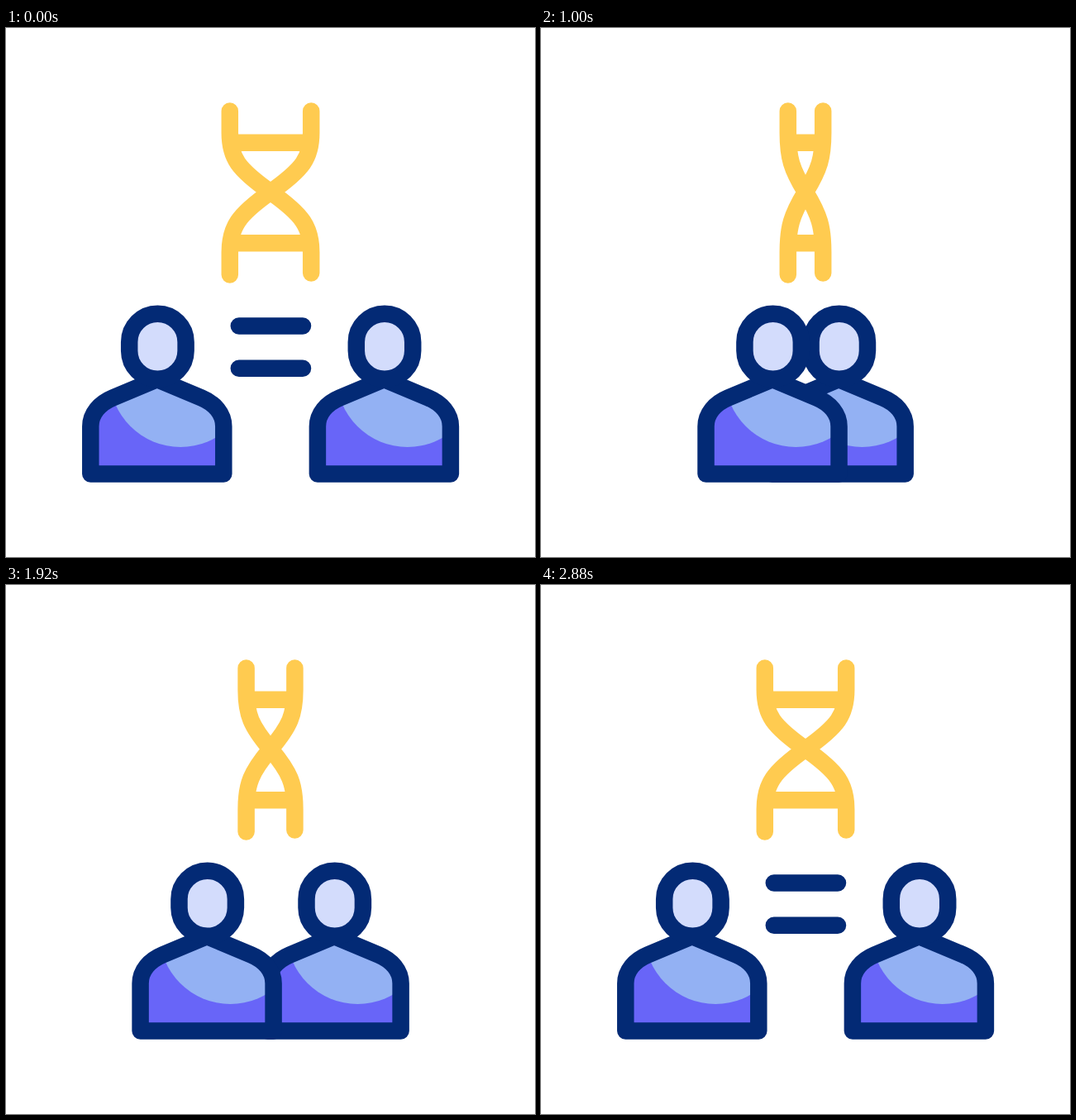
An HTML page for the animation above (3 s loop, 640x640 px).

```html
<!DOCTYPE html>
<html lang="en">
<head>
<meta charset="utf-8">
<title>Shared DNA</title>
<style>
  html, body { margin: 0; width: 100%; height: 100%; overflow: hidden; background: #fff; }
  svg { display: block; width: 100vw; height: 100vh; }
  .line { fill: none; stroke-width: 20.5; stroke-linecap: round; stroke-linejoin: round; }
  .navy { stroke: #032a75; }
  .gold { stroke: #ffcb50; }
</style>
</head>
<body>
<svg viewBox="0 0 640 640">
  <defs>
    <clipPath id="torso"><path class="body"/></clipPath>
    <g id="person">
      <path class="body" fill="#6865f8"/>
      <circle cx="28.3" cy="421.2" r="85.8" fill="#93b1f3" clip-path="url(#torso)"/>
      <path class="body line navy"/>
      <rect id="head" class="line navy" x="-33.6" y="345.8" width="68.4" height="79" rx="34.2" style="fill:#d3dcfc"/>
    </g>
  </defs>
  <path id="dna" class="line gold"/>
  <path id="bars" class="line navy"/>
  <use id="right" href="#person"/>
  <use id="left" href="#person"/>
</svg>
<script>
  const LOOP = 3000, STEP = 40;
  const $ = id => document.getElementById(id);
  const bodies = document.querySelectorAll('.body');

  // Cubic Bézier easing, solved by bisection.
  function bezier(x1, y1, x2, y2) {
    const at = (a, b, s) => 3 * a * s * (1 - s) ** 2 + 3 * b * s * s * (1 - s) + s ** 3;
    return x => {
      let lo = 0, hi = 1;
      for (let i = 0; i < 24; i++) {
        const mid = (lo + hi) / 2;
        if (at(x1, x2, mid) < x) lo = mid; else hi = mid;
      }
      return at(y1, y2, (lo + hi) / 2);
    };
  }
  const smooth = bezier(0.333, 0, 0.667, 1);
  const glide = bezier(0.33, 0, 0.2, 1);
  const speedUp = bezier(0.333, 0, 0.833, 0.833);
  const slowDown = bezier(0.167, 0.167, 0.667, 1);

  // Each row: start, end, from, to, easing.
  const tracks = {
    twist: [
      [200, 800, 49.2, 0, speedUp],
      [800, 1400, 0, 49.2, slowDown],
      [1600, 2200, 49.2, 0, speedUp],
      [2200, 2800, 0, 49.2, slowDown]
    ],
    gap: [
      [738, 1340, 137.3, 0, glide],
      [1708, 2311, 0, 137.3, glide]
    ],
    bar: [
      [200, 740, 77.2, 0, smooth],
      [1940, 2555, 0, 77.2, glide]
    ]
  };

  function value(rows, t) {
    let v = rows[0][2];
    for (const [start, end, from, to, ease] of rows) {
      if (t < start) break;
      v = t >= end ? to : from + (to - from) * ease((t - start) / (end - start));
    }
    return v;
  }

  function strand(w, end) {
    const x = k => 320 + k * w;
    return `M${x(-1)} 100.5V127C${x(-1)} 157 ${x(-0.8)} 170.7 320 198.5` +
           `C${x(0.8)} 226.3 ${x(1)} 241 ${x(1)} 271V${end}`;
  }

  function helix(w) {
    const rung = y => `M${320 - 0.9 * w} ${y}H${320 + 0.9 * w}`;
    return strand(w, 296.5) + strand(-w, 298.5) + rung(138.8) + rung(260.2);
  }

  function torso(dip) {
    const s = 447.5 + dip, c = 454.1 + dip;
    return `M-80.5 539.5V482C-80.5 466.5 -69.5 ${c} -53.7 ${s}L0 ${425 + dip}` +
           `L53.7 ${s}C69.5 ${c} 80.5 466.5 80.5 482V539.5Z`;
  }

  function draw(t) {
    const gap = value(tracks.gap, t);
    const bar = value(tracks.bar, t);
    const dip = t > 200 && t < 800 ? 5 * Math.sin(Math.PI * (t - 200) / 600) : 0;

    $('dna').setAttribute('d', helix(value(tracks.twist, t)));
    $('bars').setAttribute('d', bar > 0 ? `M281.8 360.5h${bar}M359 411.8h${-bar}` : '');
    $('left').setAttribute('transform', `translate(${320.1 - gap} 0)`);
    $('right').setAttribute('transform', `translate(${320.1 + gap} 0)`);
    $('head').setAttribute('transform', `translate(0 ${dip})`);
    bodies.forEach(b => b.setAttribute('d', torso(dip)));
  }

  const begin = performance.now();
  function tick() {
    const t = (performance.now() - begin) % LOOP;
    draw(Math.floor(t / STEP) * STEP);
    requestAnimationFrame(tick);
  }
  tick();
</script>
</body>
</html>
```
